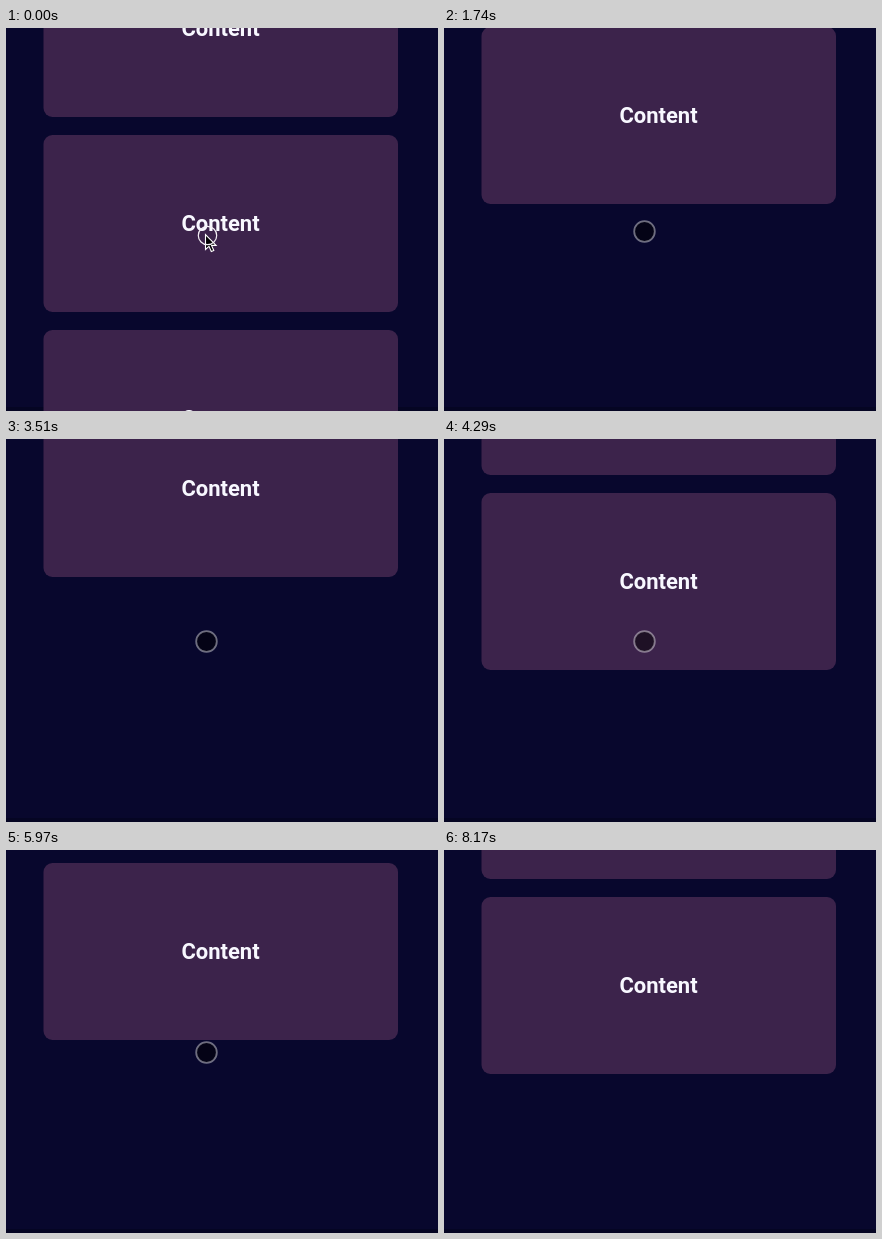
Recreate the animation shown at these times as an HTML page with a canvas. Size 432 by 383 pixels, loop 9350 ms.

```html
<!DOCTYPE html>
<html lang="en">
<head>
<meta charset="utf-8">
<title>Elastic scroll</title>
<style>
  html, body { margin: 0; width: 100%; height: 100%; overflow: hidden; background: #08072d; }
  canvas { display: block; }
</style>
</head>
<body>
<canvas width="432" height="383"></canvas>
<script>
const ctx = document.querySelector('canvas').getContext('2d');
const LOOP = 9350, REST = 224;
const CARD = { x: 37.5, width: 354.5, height: 177, pitch: 195, radius: 9 };
const TOUCH_START = 1480, EXIT_START = 7860, EXIT_END = 8150;

const mix = (a, b, u) => a + (b - a) * u;
const accelerate = u => u * (0.72 + 0.28 * u);
const slow = u => u * (1.16 - 0.16 * u);
const out = u => 1 - (1 - u) ** 2;
const inOut = u => u * u * (3 - 2 * u);

// Underdamped return to rest: first peak after 330 ms, about 11% overshoot.
function spring(ms) {
  const s = ms / 1000, decay = 6.55, omega = 9.52;
  return 1 - Math.exp(-decay * s) * (Math.cos(omega * s) + decay / omega * Math.sin(omega * s));
}

// Bottom edge of the last card: [time, position, easing towards it].
const scroll = [
  [0, 479],
  [90, 479, inOut],
  [860, 345, accelerate],
  [1740, 176, slow],
  [2380, 166, out],
  [2970, REST, 'spring'],
  [3330, REST, inOut],
  [3510, 138, out],
  [3870, 132, out],
  [4480, REST, 'spring'],
  [5000, 127, inOut],
  [5180, 118, out],
  [5950, 190, inOut],
  [6140, 178, u => u * u],
  [6410, 68, out],
  [7030, 63, inOut],
  [7640, REST, 'spring'],
  [LOOP, REST, inOut]
];

function lastBottom(t) {
  const i = scroll.findIndex(key => t < key[0]);
  const [start, from] = scroll[i - 1];
  const [end, to, ease] = scroll[i];
  const u = ease === 'spring' ? spring(t - start) : ease((t - start) / (end - start));
  return Math.round(mix(from, to, u));
}

function drawCard(bottom) {
  ctx.fillStyle = '#3c234b';
  ctx.beginPath();
  ctx.roundRect(CARD.x, bottom - CARD.height, CARD.width, CARD.height, CARD.radius);
  ctx.fill();
  ctx.fillStyle = '#f8f8ff';
  ctx.fillText('Content', 214.5, bottom - 81);
}

function drawCircle(x, y, radius, stroke, width, fill) {
  ctx.beginPath();
  ctx.arc(x, y, radius, 0, Math.PI * 2);
  if (fill) {
    ctx.fillStyle = fill;
    ctx.fill();
  }
  ctx.strokeStyle = stroke;
  ctx.lineWidth = width;
  ctx.stroke();
}

const arrow = new Path2D('M199.5 206.5v15l3.5-3.2 2.3 5.2 2.5-1-2.3-5.1h4.6z');

function drawPointer(t) {
  if (t >= EXIT_END) return;
  if (t < TOUCH_START) {
    ctx.fillStyle = '#000';
    ctx.fill(arrow);
    ctx.strokeStyle = '#fff';
    ctx.lineWidth = 1.1;
    ctx.stroke(arrow);
    if (t < 90) drawCircle(201.5, 207.5, 9.2, '#f4f0f6', 1.2);
    return;
  }
  const u = Math.max(0, (t - EXIT_START) / (EXIT_END - EXIT_START));
  const y = t < 2970 ? 203.5 : 202.5;
  drawCircle(mix(200.5, 440, u), mix(y, 244, u), 10.3, 'rgba(255,255,255,.42)', 1.8, 'rgba(0,0,0,.5)');
}

function draw(now) {
  const t = now % LOOP;
  ctx.fillStyle = '#08072d';
  ctx.fillRect(0, 0, 432, 383);
  ctx.fillStyle = '#050523';
  ctx.fillRect(0, 379, 432, 4);
  ctx.font = 'bold 22px Roboto, sans-serif';
  ctx.textAlign = 'center';
  for (let bottom = lastBottom(t); bottom > 0; bottom -= CARD.pitch) drawCard(bottom);
  drawPointer(t);
}

const begin = performance.now();
function tick() {
  draw(performance.now() - begin);
  requestAnimationFrame(tick);
}
tick();
</script>
</body>
</html>
```
